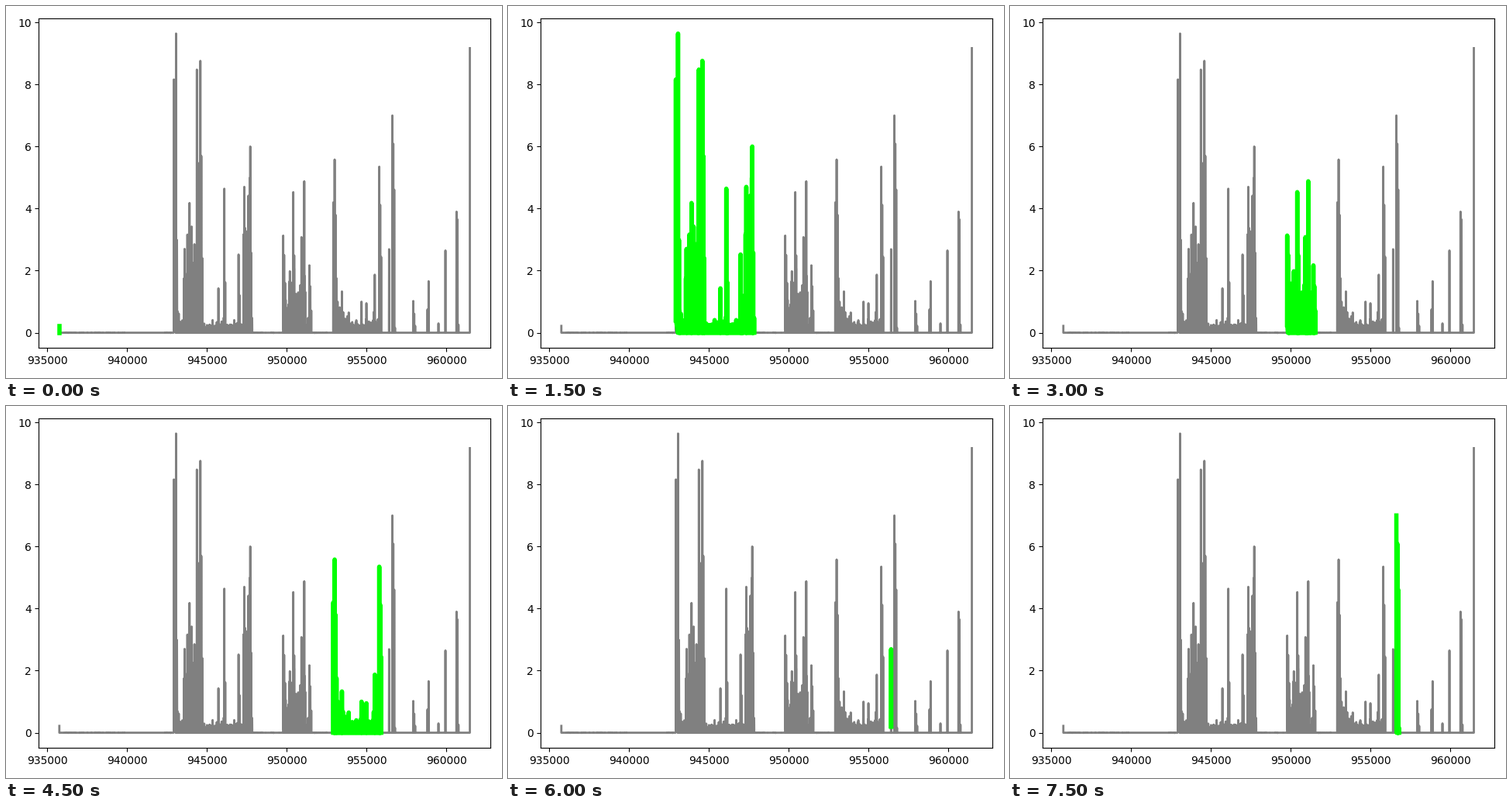
Recreate the animation shown at these times as a matplotlib script. Size 640 by 480 pixels, loop 8 s.

```python
import numpy as np
import matplotlib.pyplot as plt
from matplotlib.animation import FuncAnimation

rng = np.random.default_rng(4)


def to_time(col):
    """Time shown at a horizontal pixel position on the stage."""
    return 935000 + (col - 53) * 48.5


def shoulders(col, height, ratio=0):
    """A peak and the two weaker ones that follow it."""
    yield col, height
    if ratio:
        yield col + 1.2, height * ratio
        yield col + 2.4, height * ratio ** 3


def noise(start, end, low, high):
    """Random columns whose level drifts from low to high."""
    cols = np.arange(start, end, .9)
    levels = np.linspace(low, high, len(cols))
    gain = np.minimum(.6 + rng.exponential(.25, len(cols)), 1.6)
    return list(zip(cols, levels * gain))


def zigzag(columns, onset=0):
    """Polyline that jumps up to every column and back to the base."""
    points = []
    for i, (col, height) in enumerate(sorted(columns)):
        base = 0 if i else onset
        points += [(col - .2, base), (col, height), (col + .2, base)]
    return points


def burst(peaks, bands=(), onset=0):
    columns = [c for peak in peaks for c in shoulders(*peak)]
    for band in bands:
        columns += noise(*band)
    return zigzag(columns, onset)


def quiet(start, end):
    cols = np.arange(start, end, 2.5)
    return zigzag(zip(cols, rng.uniform(-.01, .01, len(cols))))


def xy(points):
    cols, values = np.array(points).T
    return to_time(cols), values


# Peaks are (column, height, shoulder ratio); bands feed noise().
blip = [(68.7, .22), (68.7, 0)]
long_burst = burst(
    [(216.5, 8.16), (219.3, 9.64, .31), (230.3, 2.7), (236.7, 4.18),
     (246.2, 8.48), (250.7, 8.76, .65), (274, 1.43), (281.6, 4.64, .35),
     (300, 2.52, .48), (307.4, 4.7), (315.1, 6, .43)],
    [(221, 229, .45, .4), (229.5, 245, 1.8, 2.4), (245, 252, 3.3, 3.5),
     (253, 305, .25, .35), (306.5, 315, 3.6, 3.8)],
    onset=.4)
mid_burst = burst(
    [(357.6, 3.13, .8), (370.6, 4.53, .55), (381.2, 3.08, .9),
     (384.8, 4.88, .27), (391.4, 2.17, .69)],
    [(359, 386, 1.1, 1.6), (387, 391, .3, .3)],
    onset=.25)
wide_burst = burst(
    [(422.3, 4.2), (424, 5.58, .68), (433.4, 1.33), (458.7, 1),
     (465, .95), (475.8, 1.87), (481.6, 5.35, .77)],
    [(426, 452, .65, .3), (452, 481, .3, .45)])
short = burst([(494.3, 2.69)], onset=.2)
tall = burst([(498.5, 7, .87), (501.9, .16)])[1:]
tail = burst([(525.5, 1.02, .6), (543.9, .75), (545.3, 1.66), (558, .3),
              (567, 2.65), (581.3, 3.9), (582.6, 3.65, .07)])

bursts = [blip, long_burst, mid_burst, wide_burst, short, tall]

signal = (
    blip + quiet(75, 155) + quiet(205, 214) + [(216.3, 0)]
    + long_burst + quiet(320, 354) + [(357.4, 0)]
    + mid_burst + quiet(396, 419) + wide_burst + [(494.1, 0)]
    + short + [(494.5, 0), (498.4, 0)] + tall
    + tail + [(598.5, 0), (598.5, 9.17)]
)

fig, ax = plt.subplots(figsize=(6.4, 4.8), dpi=100)
ax.plot(*xy(signal), color="gray", linewidth=2)
marker, = ax.plot(*xy(blip), color="lime", linewidth=4)
fig.tight_layout()


def update(i):
    marker.set_data(*xy(bursts[i // 3]))
    return marker,


anim = FuncAnimation(fig, update, frames=16, interval=500, repeat=True,
                     repeat_delay=0)
plt.show()
```
